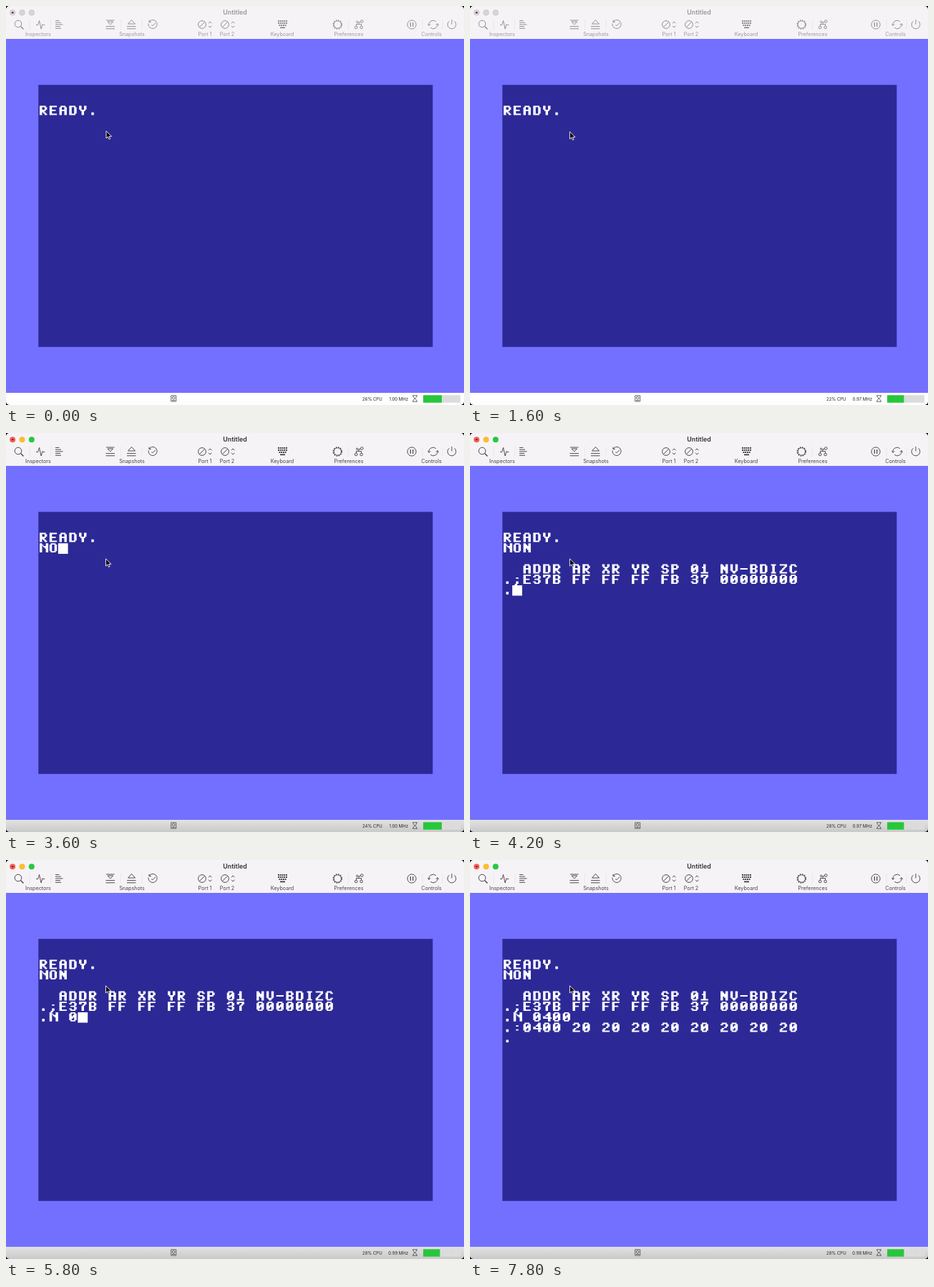
Recreate the animation shown at these times as an HTML page. Size 640 px wide and 558 px high, loop 8 s.

```html
<!DOCTYPE html>
<html lang="en">
<head>
<meta charset="utf-8">
<title>Emulator window</title>
<style>
  html, body { margin: 0; width: 100%; height: 100%; overflow: hidden; background: #000; }
  svg { display: block; width: 100%; height: 100%; font-family: Inter, sans-serif; }
  #icons { fill: none; stroke: #888689; stroke-width: .9; }
  #labels { fill: #9a989b; font-size: 7.2px; text-anchor: middle; }
  #title { font-size: 8.8px; font-weight: 600; }
  #lights circle { fill: #d6d4d7; stroke: #c3c1c4; stroke-width: .5; }
  #status { fill: #fefefe; }
  #info { font-size: 6px; fill: #262626; }
  .small { fill: none; stroke: #444; stroke-width: .8; }
  .active #icons { stroke: #3d3c3e; }
  .active #labels { fill: #454446; }
  .active #title { fill: #333; }
  .active #lights circle { fill: var(--c); stroke: none; }
  .active #status { fill: url(#grey); }
</style>
</head>
<body>
<svg id="stage" viewBox="0 0 640 558" preserveAspectRatio="none">
  <defs>
    <linearGradient id="grey" x2="0" y2="1">
      <stop stop-color="#e2e2e2"/><stop offset="1" stop-color="#c9c9c9"/>
    </linearGradient>
    <clipPath id="window"><rect width="640" height="558" rx="5"/></clipPath>
  </defs>
  <g clip-path="url(#window)">
    <rect width="640" height="558" fill="#7470ff"/>
    <rect width="640" height="46" fill="#f5f3f6"/>
    <rect id="status" y="541" width="640" height="17"/>

    <g id="lights">
      <circle cx="9.2" cy="9.2" r="4" style="--c:#ff5f57"/>
      <circle cx="22.5" cy="9.2" r="4" style="--c:#febc2e"/>
      <circle cx="35.8" cy="9.2" r="4" style="--c:#28c840"/>
    </g>
    <circle cx="9.2" cy="9.2" r="1.3" fill="#5b2a28"/>

    <path d="M33 19v14M62.5 19v14M160.5 19v14M190 19v14M478.5 19v14M582 19v14M610 19v14" stroke="#e4e2e5" stroke-width=".7"/>
    <g id="icons">
      <circle cx="17" cy="25" r="4.8"/>
      <path d="M20.5 28.5l4 4" stroke-width="1.3"/>
      <path d="M42 26.5h2.6l1.9-6 2.6 11.5 2-6.5.8 1h2.3"/>
      <path d="M69 20.5h5.5M69 23.2h8M69 25.9h10.5M69 28.6h7M69 31.3h8"/>
      <path d="M140 20h11.5M142 22l3.8 4 3.8-4zM139.5 28.6h12.5M139.5 31.8h12.5"/>
      <path d="M170.5 25l5-5.5 5 5.5zM169 28.6h12.5M169 31.8h12.5"/>
      <path d="M200 22.2a6 6 0 1 1-.9 2.3M200 19.8v2.8h2.8M203.3 27l2 .3 3.6-3.5"/>
      <g id="port">
        <circle cx="274" cy="26" r="5.4"/>
        <path d="M270.2 29.8l7.6-7.6M283 24.3l2.2-2.4 2.2 2.4M283 27.7l2.2 2.4 2.2-2.4"/>
      </g>
      <use href="#port" x="32"/>
      <path d="M380 21h13M380 24h13M381.5 27h10" stroke-width="1.9" stroke-dasharray="1.9 .85"/>
      <path d="M383 30.3h7" stroke-width="1.7"/>
      <circle cx="463.3" cy="26" r="5.2"/>
      <circle cx="463.3" cy="26" r="6.1" stroke-width="1.3" stroke-dasharray="1.6 1.59"/>
      <path d="M489.5 28v-2.5h7v2.5M493 25.5v-3h2.5"/>
      <circle cx="489.2" cy="30" r="1.8"/><circle cx="496.6" cy="30" r="1.8"/>
      <circle cx="497.3" cy="21.5" r="1.8"/><circle cx="490.7" cy="22.3" r="1.2"/>
      <circle cx="567" cy="26" r="6.1"/>
      <path d="M565.3 23v6M568.7 23v6" stroke-width="1.2"/>
      <path d="M591 27a6 6 0 0 1 9.8-5.4M603 25a6 6 0 0 1-9.8 5.4M589.4 25l1.7 2.5 2-2.2M604.6 27l-1.7-2.5-2 2.2"/>
      <path d="M619.3 21.3a5.9 5.9 0 1 0 7.2 0M622.9 19v6.5"/>
    </g>

    <g id="labels">
      <text id="title" x="320" y="12">Untitled</text>
      <text x="45" y="42.3">Inspectors</text>
      <text x="176" y="42.3">Snapshots</text>
      <text x="278" y="42.3">Port 1</text>
      <text x="309" y="42.3">Port 2</text>
      <text x="386" y="42.3">Keyboard</text>
      <text x="479" y="42.3">Preferences</text>
      <text x="594.5" y="42.3">Controls</text>
    </g>

    <rect x="45.3" y="110.3" width="551" height="366.5" fill="#2c2996"/>
    <g id="screen" role="img" fill="#fff" transform="translate(45.3 110.3) scale(1.7219 1.8325)"></g>

    <path id="pointer" d="M0 0v10.2l2.4-2.2 1.6 3.6 1.7-.7-1.6-3.4h3.4z" fill="#000" stroke="#fff" stroke-width=".9"/>

    <g class="small">
      <path d="M230.7 544.8h7v8.2h-7z"/><circle cx="234.2" cy="548" r="1.8"/><path d="M232 551.5h4.4"/>
      <path d="M568 544.8h7M568 553.2h7M569 545v1.8l4.8 4.4v1.8M573.8 545v1.8l-4.8 4.4v1.8"/>
    </g>
    <g id="info">
      <text id="cpu" x="498" y="552"></text>
      <text id="speed" x="562" y="552" text-anchor="end"></text>
    </g>
    <rect x="583" y="544.3" width="52" height="10.4" fill="#dededf"/>
    <rect id="level" x="583" y="544.3" height="10.4" fill="#27c93c"/>
    <path d="M583 549.5h52" stroke="#000" stroke-opacity=".08" stroke-width="10.4" stroke-dasharray=".4 2.2"/>
  </g>
</svg>
<script>
const LOOP = 8000, STEP = 200, BLINK = 310;
const $ = id => document.getElementById(id);
const box = (x, y, w, h) => `M${x} ${y}h${w}v${h}h${-w}z`;

// Strokes shared by the letters, on an 8 by 8 cell.
const strokes = {
  t: box(2, 0, 4, 1), T: box(1, 0, 6, 1),
  m: box(2, 3, 4, 1), M: box(1, 3, 6, 1),
  b: box(2, 6, 4, 1), B: box(1, 6, 6, 1),
  s: box(1, 0, 2, 7), S: box(5, 0, 2, 7), c: box(3, 0, 2, 7),
  l: box(1, 1, 2, 5), r: box(5, 1, 2, 5),
  h: box(1, 1, 2, 6), H: box(5, 1, 2, 6),
  p: box(1, 1, 2, 2), q: box(5, 1, 2, 2), u: box(5, 4, 2, 2),
  g: box(1, 1, 2, 1), i: box(5, 1, 2, 1), e: box(1, 5, 2, 1), j: box(5, 5, 2, 1),
  d: box(3, 5, 2, 2), o: box(3, 2, 2, 1)
};
const glyph = (keys, extra = '') => [...keys].map(k => strokes[k]).join('') + extra;
const glyphs = {
  A: glyph('thHm'), B: glyph('stqmub'), C: glyph('tlbij'), D: glyph('strb'),
  E: glyph('sTmB'), F: glyph('sTm'), I: glyph('tcb'), O: glyph('tlrb'),
  P: glyph('stqm'), S: glyph('tpimueb'),
  M: glyph('s', box(6, 0, 2, 7) + 'M3 1h1v1h2v-1h1v2h-1v1h-1v-1h-1z'),
  N: glyph('sS', 'M3 1h1v1h1v3h-1v-1h-1z'),
  R: glyph('stqm', 'M3 4h2v1h1v1h1v1h-2v-1h-1v-1h-1z'),
  V: 'M1 0h2v5h2v-5h2v5h-1v1h-1v1h-2v-1h-1v-1h-1z',
  X: 'M1 0h2v2h2v-2h2v2h-1v1h-1v1h1v1h1v2h-2v-2h-2v2h-2v-2h1v-1h1v-1h-1v-1h-1z',
  Y: 'M1 0h2v3h2v-3h2v3h-1v1h-1v3h-2v-3h-1v-1h-1z',
  Z: glyph('TB', 'M5 1h2v1h-1v1h-1v1h-1v1h-1v1h-2v-1h1v-1h1v-1h1v-1h1z'),
  0: glyph('tlrb', 'M4 2h1v2h-1v1h-1v-2h1z'),
  1: glyph('cB', box(2, 2, 1, 1)),
  2: glyph('tgqeB', 'M4 3h2v1h-2v1h-2v-1h2z'),
  3: glyph('tgqmueb'),
  4: glyph('S', 'M4 1h1v2h-2v-1h1z' + box(1, 3, 2, 1) + box(1, 4, 7, 1)),
  7: glyph('Tgi', box(4, 2, 2, 1) + box(3, 3, 2, 4)),
  '-': glyph('M'), '.': glyph('d'), ':': glyph('o', box(3, 5, 2, 1)),
  ';': glyph('od', box(2, 7, 2, 1))
};

const output = [
  [40, '\n\nREADY.\n'],
  [3200, 'M'], [3400, 'O'], [3800, 'N'],
  [4000, '\n\n  ADDR AR XR YR SP 01 NV-BDIZC\n.;E37B FF FF FF FB 37 00000000\n.'],
  [4800, 'M'], [5200, ' '], [5600, '0'], [6200, '4'], [6600, '0'], [7000, '0'],
  [7400, '\n.:0400' + ' 20'.repeat(8) + '\n.']
];
const load = [
  [0, 26, '1.00'], [800, 24, '0.98'], [1600, 22, '0.97'], [2400, 24, '0.98'],
  [3200, 24, '1.00'], [4000, 28, '0.97'], [5200, 28, '0.99'], [6400, 28, '0.98']
];

const cell = (col, row, d) => `<path transform="translate(${col * 8} ${row * 8})" d="${d}"/>`;

function drawScreen(t) {
  const shown = output.filter(([at], n) => !n || at <= t);
  const text = shown.map(([, part]) => part).join('');
  const lines = text.split('\n');
  const shapes = lines.flatMap((line, row) =>
    [...line].map((ch, col) => glyphs[ch] ? cell(col, row, glyphs[ch]) : ''));
  const sinceKey = t - shown.at(-1)[0];
  if (!(Math.floor(sinceKey / BLINK) & 1)) {
    shapes.push(cell(lines.at(-1).length, lines.length - 1, box(0, 0, 8, 8)));
  }
  $('screen').innerHTML = shapes.join('');
  $('screen').setAttribute('aria-label', text.trim());
}

function draw(t) {
  drawScreen(t);
  const [, cpu, mhz] = load.findLast(([at]) => at <= t);
  $('cpu').textContent = `${cpu}% CPU`;
  $('speed').textContent = `${mhz} MHz`;
  $('level').setAttribute('width', (mhz === '1.00' ? 10 : 9) * 2.6);
  $('pointer').setAttribute('transform', t < 600 ? 'translate(140 174.8)' : 'translate(139.4 175.8)');
  $('stage').classList.toggle('active', t >= 2800);
}

let last = -1;
const start = performance.now();
function tick() {
  const t = Math.floor((performance.now() - start) % LOOP / STEP) * STEP;
  if (t !== last) draw(last = t);
  requestAnimationFrame(tick);
}
tick();
</script>
</body>
</html>
```
